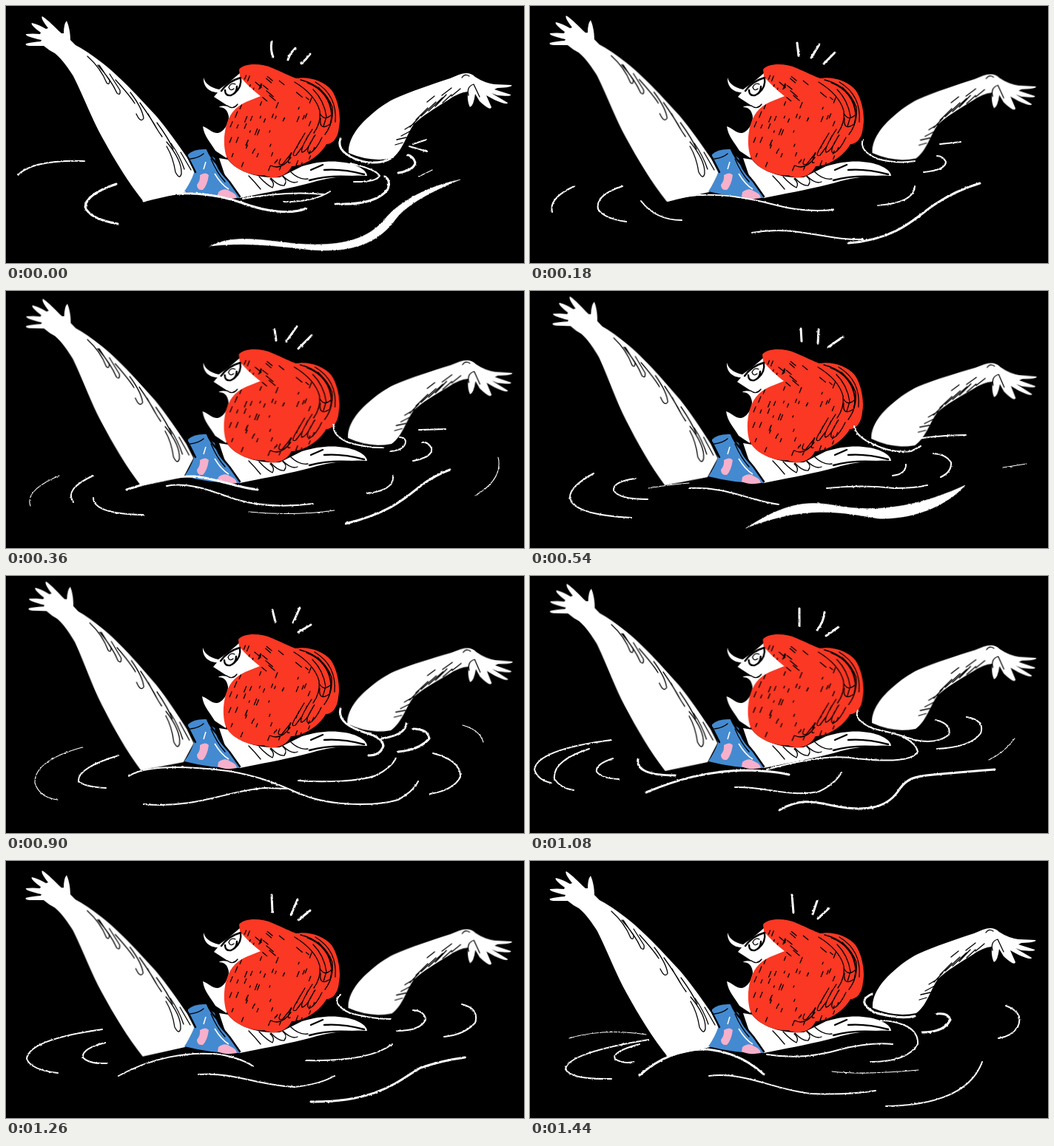
Animation, 700 px wide and 348 px high, one loop 1620 ms. Source, as an HTML page:

```html
<!DOCTYPE html>
<html lang="en">
<head>
<meta charset="utf-8">
<title>Swimmer</title>
<style>
html, body { margin: 0; width: 100%; height: 100%; overflow: hidden; background: #000; }
svg { display: block; width: 100%; height: 100%; }
.ink path { fill: none; stroke: #000; stroke-width: 1.3; stroke-linecap: round; stroke-linejoin: round; }
.ink .heavy { stroke-width: 2.4; }
.wave { visibility: hidden; animation: show 1620ms step-end infinite; animation-delay: calc(var(--i) * 180ms - 1620ms); }
.wave path { fill: none; stroke: #fff; stroke-width: 2; stroke-linecap: round; }
.wave .bold { stroke-width: 3; }
.wave .thin { stroke-width: 1.1; }
.wave .brush { fill: #fff; stroke-width: .5; }
.wave .dash { stroke-width: 3; }
.left { transform-origin: 240px 215px; animation: left 1620ms step-end infinite; }
.right { transform-origin: 490px 205px; animation: right 1620ms step-end infinite; }
.head { animation: head 1620ms step-end infinite; }

@keyframes show {
  0% { visibility: visible; }
  11.111%, 100% { visibility: hidden; }
}
@keyframes left {
  0%, 88.888%, 100% { transform: none; }
  11.111%, 77.777% { transform: translate(-1px, 0) rotate(.3deg); }
  22.222%, 66.666% { transform: translate(-2.5px, 0) rotate(1deg); }
  33.333%, 55.555% { transform: translate(-2px, 0) rotate(2deg); }
  44.444% { transform: translate(-2px, 0) rotate(2.3deg); }
}
@keyframes right {
  0%, 88.888%, 100% { transform: none; }
  11.111%, 77.777% { transform: translate(-.5px, .2px) rotate(.5deg); }
  22.222%, 66.666% { transform: translate(-1px, .5px) rotate(1deg); }
  33.333%, 55.555% { transform: translate(-2px, 2px) rotate(2deg); }
  44.444% { transform: translate(-2px, 2px) rotate(2.3deg); }
}
@keyframes head {
  0%, 77.777%, 100% { transform: none; }
  22.222%, 66.666% { transform: translate(-.4px, 0); }
  33.333%, 55.555% { transform: translate(-1px, 0); }
}
</style>
</head>
<body>
<svg viewBox="0 0 700 348">
  <defs>
    <filter id="chalk" filterUnits="userSpaceOnUse" x="0" y="0" width="700" height="348">
      <feTurbulence type="fractalNoise" baseFrequency=".35" numOctaves="2" seed="4"/>
      <feDisplacementMap in="SourceGraphic" scale="2.4" xChannelSelector="R" yChannelSelector="G"/>
    </filter>
    <clipPath id="hairClip"><use href="#hair"/></clipPath>
  </defs>
  <rect width="700" height="348"/>

  <!-- back and shoulders -->
  <path fill="#fff" d="M288 206L300 208C312 224 340 234 370 232L400 217C422 210 442 209 458 212C476 215 488 223 488 230C470 228 440 232 420 237C390 246 350 253 316 260L298 236Z"/>
  <g class="ink">
    <path d="M342 231Q352 242 360 246Q364 240 357 234M358 233Q368 244 376 243Q381 236 374 231M374 230Q386 242 394 238M384 224Q396 236 408 234M328 230Q336 238 344 248"/>
    <path class="heavy" d="M412 222L428 215M430 222Q454 220 484 228M410 236Q440 228 476 232"/>
  </g>

  <g class="left">
    <path fill="#fff" d="M87 46C87 36 85 27 82 20Q78 24 78 37L75 37C65 28 57 19 49 14Q46 16 57 30L54 31Q44 25 35 23Q32 25 47 36L46 38Q36 37 27 38Q25 41 48 46L47 48Q35 49 27 51Q25 54 35 54L51 54Q58 60 66 64C76 72 84 84 91 95C106 125 117 155 130 178C147 209 166 240 186 265L243 252L256 226L246 207C231 185 218 167 203 149L176 120C159 102 144 88 130 77Q108 60 94 53Z"/>
    <g class="ink">
      <path d="M110 68Q128 84 136 104Q140 108 140 101L126 80M124 80Q142 100 150 118Q155 122 154 114L140 92M148 100Q168 122 174 132M168 117Q184 138 186 152Q182 159 176 146M181 131Q196 152 205 168M192 146Q203 166 211 177M204 158Q220 180 226 194"/>
      <path d="M217 184Q238 209 237 227Q235 236 229 225Q226 205 217 190M223 186Q235 203 241 221M236 198L250 222"/>
    </g>
  </g>

  <!-- swimsuit -->
  <path fill="#448ad0" d="M246 201Q254 193 271 194Q276 203 282 206C284 220 292 230 302 238Q311 249 316 260Q280 261 241 251Q250 238 254 226Q253 215 246 207Z"/>
  <path fill="#f6b0cb" d="M262 229Q270 224 274 229Q272 243 266 249Q258 250 258 242Q263 236 262 229ZM287 252Q296 245 303 251Q311 254 312 260Q296 263 286 258Z"/>
  <path fill="none" stroke="#fff" stroke-width="1.5" d="M270 211L267 221M282 227Q291 242 301 248"/>
  <g class="ink">
    <path d="M249 207Q260 206 267 200M277 207Q285 226 296 238"/>
    <path class="heavy" d="M272 194Q277 206 286 215M284 206Q287 222 302 238L316 258M246 205L256 225"/>
  </g>

  <g class="head">
    <path fill="#fff" d="M267 97Q270 109 288 113Q303 103 316 91L347 122C325 128 307 144 300 162L298 206L283 196C276 184 268 177 266 163C273 165 278 172 286 172C294 171 301 160 301 150Q299 137 288 137Q290 134 301 136L281 123L286 117C274 117 266 108 267 97Z"/>
    <path id="hair" fill="#fa3823" d="M315 86C321 77 345 77 360 84C374 90 384 95 392 98C410 95 430 102 440 114C449 127 453 150 450 164C449 179 441 187 433 187C426 200 407 216 386 217C380 231 361 236 349 229C329 231 302 218 297 201C292 182 296 157 306 144C317 130 331 128 344 122C334 114 323 104 316 95Z"/>
    <g class="ink">
      <path class="heavy" d="M291 115Q300 102 317 97Q319 110 309 118M296 114Q296 122 304 121Q312 118 312 109"/>
      <path d="M310 106Q304 103 301 110Q303 116 308 112M299 135Q307 141 313 133"/>
      <g clip-path="url(#hairClip)">
        <path id="ticks"/>
        <path d="M398 100Q430 108 441 137Q443 158 431 174M407 104Q437 116 440 147Q430 157 424 145M390 103Q418 120 424 142Q426 158 416 172M415 113Q430 128 433 150L429 163M422 110Q446 132 438 160Q423 170 425 152M418 103Q448 121 445 157"/>
        <path d="M414 167Q397 193 400 198Q406 198 416 177Q421 170 412 184Q404 199 411 199Q419 195 427 178M404 172L391 194Q385 205 392 202L401 190M371 207Q366 217 374 214L386 199Q378 215 384 212M385 205Q372 223 358 216"/>
      </g>
    </g>
  </g>

  <g class="right">
    <path fill="#fff" d="M463 199C462 181 475 164 488 152C501 140 512 132 524 126C546 116 576 106 600 98L612 93Q626 88 634 96Q646 104 660 106L683 107Q686 110 664 111L660 113L682 120Q684 123 664 121L656 118L678 131Q678 135 660 127L649 121L656 137Q655 143 640 129L634 119Q632 135 627 137Q623 130 624 116Q612 117 598 127C580 138 561 150 551 160C541 175 536 196 522 206Q493 212 463 199Z"/>
    <g class="ink">
      <path d="M616 97Q620 91 626 95M625 121Q622 109 632 106L640 123M590 131L602 120M580 136L595 120M571 142L590 124M561 149L581 130M554 154L570 138M546 164L558 151M539 167L552 159M534 176L547 169M528 181L541 178M526 188L536 185M602 122L614 112M569 130L579 122M589 121L602 111"/>
    </g>
  </g>

  <g filter="url(#chalk)">
    <g class="wave" style="--i:0">
      <path d="M16 229Q36 208 106 210"/>
      <path class="bold" d="M149 241Q108 255 107 272Q112 288 151 295"/>
      <path class="bold" d="M186 264C230 245 290 256 320 267C350 278 384 283 406 274"/>
      <path d="M375 265Q415 266 438 251M320 261Q380 250 430 255M465 213Q500 221 505 230Q499 239 470 238M545 190L569 197M550 187L568 181"/>
      <path class="brush" d="M276 325C310 308 350 318 395 322C450 326 490 318 515 285C540 258 580 242 614 235C585 247 545 265 527 288C500 326 460 334 410 330C360 324 320 320 276 325Z"/>
      <path class="bold" d="M445 268Q500 270 516 248Q520 235 512 231M452 180C446 195 465 208 490 212Q512 213 523 204M530 226Q552 222 553 212Q550 203 543 202"/>
      <path class="thin" d="M558 231L576 222"/>
      <path class="dash" d="M361 69Q357 60 359 48M381 73Q383 65 391 57M399 78Q406 72 411 65"/>
    </g>
    <g class="wave" style="--i:1">
      <path d="M60 244Q25 260 30 279M125 244Q88 256 92 275Q100 288 130 292M150 264Q170 290 205 290M186 264C230 248 290 258 330 269Q370 280 410 276M300 307C360 296 400 318 450 316M470 270Q520 266 520 244M450 181Q444 196 470 207Q495 214 520 210M532 225Q562 222 562 211Q558 203 550 203M554 187L582 184"/>
      <path class="bold" d="M430 321C500 316 525 282 548 268Q575 250 608 240"/>
      <path class="dash" d="M363 68L361 50M380 70L391 52M397 78L412 63"/>
    </g>
    <g class="wave" style="--i:2">
      <path class="thin" d="M33 291Q25 270 72 250M634 277Q672 255 665 225"/>
      <path d="M91 286Q78 268 118 250M118 280Q118 302 186 303M217 264C250 258 280 272 310 282C340 291 375 293 415 288M488 274Q525 270 523 250M550 230Q577 225 575 213Q570 203 562 205M443 181Q440 195 462 205Q490 213 510 212M520 217Q540 215 540 203Q538 198 532 198M558 188L594 187"/>
      <path class="thin" d="M328 299Q390 305 444 297"/>
      <path class="bold" d="M163 269C195 259 220 250 255 251C290 255 310 266 340 269M459 315C520 300 540 280 560 264Q580 249 600 242"/>
      <path class="dash" d="M365 67L363 52M379 68L393 48M395 78L413 60"/>
    </g>
    <g class="wave" style="--i:3">
      <path d="M86 247Q53 265 54 280Q58 303 137 307M142 254Q112 258 113 270Q120 282 159 282M215 267C265 264 300 285 336 289M401 267Q450 262 492 267Q520 267 537 263M555 252Q570 245 569 232Q562 221 545 220M508 235Q508 248 490 250M515 202Q540 196 589 195M438 183Q440 197 465 208Q490 220 515 217L528 210"/>
      <path class="thin" d="M160 267Q190 262 215 260M639 239L671 234"/>
      <path class="brush" d="M292 321C340 290 370 283 410 290C470 302 530 290 588 263C560 295 510 310 470 308C420 299 370 290 292 321Z"/>
      <path class="dash" d="M367 68L366 51M389 71L390 52M403 76L423 62"/>
    </g>
    <g class="wave" style="--i:4">
      <path class="thin" d="M95 238Q8 252 8 278Q16 293 42 297M620 218Q650 225 650 240"/>
      <path d="M146 248Q102 258 104 274Q114 286 146 287M176 269C220 258 280 264 315 275Q350 286 380 287M235 309C310 306 340 286 385 288C430 292 470 312 530 303Q565 290 572 275M398 272Q460 276 500 268Q520 260 526 248M448 181Q446 200 480 211Q510 220 509 232Q504 244 488 245M512 216Q538 212 541 202M550 214Q572 217 571 231Q560 245 540 247"/>
      <path class="dash" d="M366 65L363 48M389 67L394 47M399 76L418 64"/>
    </g>
    <g class="wave" style="--i:5">
      <path class="thin" d="M103 232Q38 250 39 280Q45 300 70 303M617 202Q640 208 645 225"/>
      <path d="M152 243Q96 260 98 278Q108 286 135 287M186 309C260 315 300 290 350 287L380 288M395 277C430 280 480 278 500 270Q520 260 527 247M577 240Q615 250 614 272Q605 290 573 295"/>
      <path d="M166 271C190 255 250 258 300 264C350 272 380 288 400 296C440 312 500 312 530 303Q550 292 557 278"/>
      <path class="bold" d="M452 180Q447 200 485 212Q508 218 510 230Q506 243 490 243M508 220Q540 215 541 200M550 207Q570 207 572 220Q560 235 530 238"/>
      <path class="dash" d="M364 62L360 46M388 63L397 43M395 76L412 66"/>
    </g>
    <g class="wave" style="--i:6">
      <path d="M110 222Q10 235 6 262Q10 276 28 280M80 234Q30 250 33 275Q42 288 59 290M112 247Q88 255 90 265Q97 274 120 275M277 286C320 285 350 300 390 292Q412 282 421 266M320 262Q400 240 440 247Q515 255 524 238Q522 226 500 216M443 182Q436 195 465 207Q490 212 520 222Q550 228 566 215Q570 200 548 195M590 191Q615 195 609 213Q595 232 550 234"/>
      <path class="thin" d="M620 249Q640 240 655 220"/>
      <path class="bold" d="M146 248Q142 270 196 270M157 293C200 275 240 264 290 263Q330 264 350 269M337 317C365 300 385 306 410 311C450 319 480 316 497 292C508 274 520 271 545 269Q590 265 628 262"/>
      <path class="dash" d="M364 68L364 44M388 73Q397 62 398 49M400 81L417 69"/>
    </g>
    <g class="wave" style="--i:7">
      <path d="M130 228Q30 242 28 268Q34 283 70 287M134 246Q102 254 104 266Q112 275 136 274M152 291C195 267 245 257 290 262Q320 268 334 278M260 289C310 286 340 304 390 306Q425 302 444 291M405 270Q490 272 522 248M452 181Q438 193 465 206Q495 214 520 214M528 230Q560 230 567 215Q566 203 550 202M616 194Q640 200 634 219Q620 235 592 238"/>
      <path class="bold" d="M412 326C500 327 530 298 560 280Q590 270 620 266"/>
      <path class="dash" d="M360 69L359 46M385 73L394 52M395 80L411 67"/>
    </g>
    <g class="wave" style="--i:8">
      <path class="thin" d="M157 235Q100 226 53 240M408 285Q450 290 525 283"/>
      <path d="M160 242Q50 260 48 282Q55 296 110 295M148 248Q110 258 115 268Q125 275 140 272M242 291C290 285 330 310 380 315Q430 317 467 311M320 262Q370 270 420 255Q460 245 490 248M460 272Q510 272 524 248Q525 230 505 222Q490 216 474 216M643 196Q668 205 659 225Q650 238 633 240M481 332Q590 330 611 272"/>
      <path class="bold" d="M148 290Q190 253 240 255Q285 260 316 289M462 180Q440 190 465 205Q500 215 520 210M530 232Q560 232 568 215Q565 205 550 207"/>
      <path class="dash" d="M356 70L354 46M382 72L388 54M389 78L404 64"/>
    </g>
  </g>
</svg>
<script>
// Short pencil ticks scattered over the hair.
let seed = 11;
const random = () => (seed = seed * 16807 % 2147483647) / 2147483647;
let ticks = '';
for (let i = 0; i < 80; i++) {
  const x = 300 + random() * 115, y = 88 + random() * 135;
  const lean = x > 345 && y < 130 ? -1.2 : .4;
  const length = 2 + random() * 6;
  ticks += `M${x} ${y}l${length * lean} ${-length}`;
}
document.getElementById('ticks').setAttribute('d', ticks);
</script>
</body>
</html>
```
